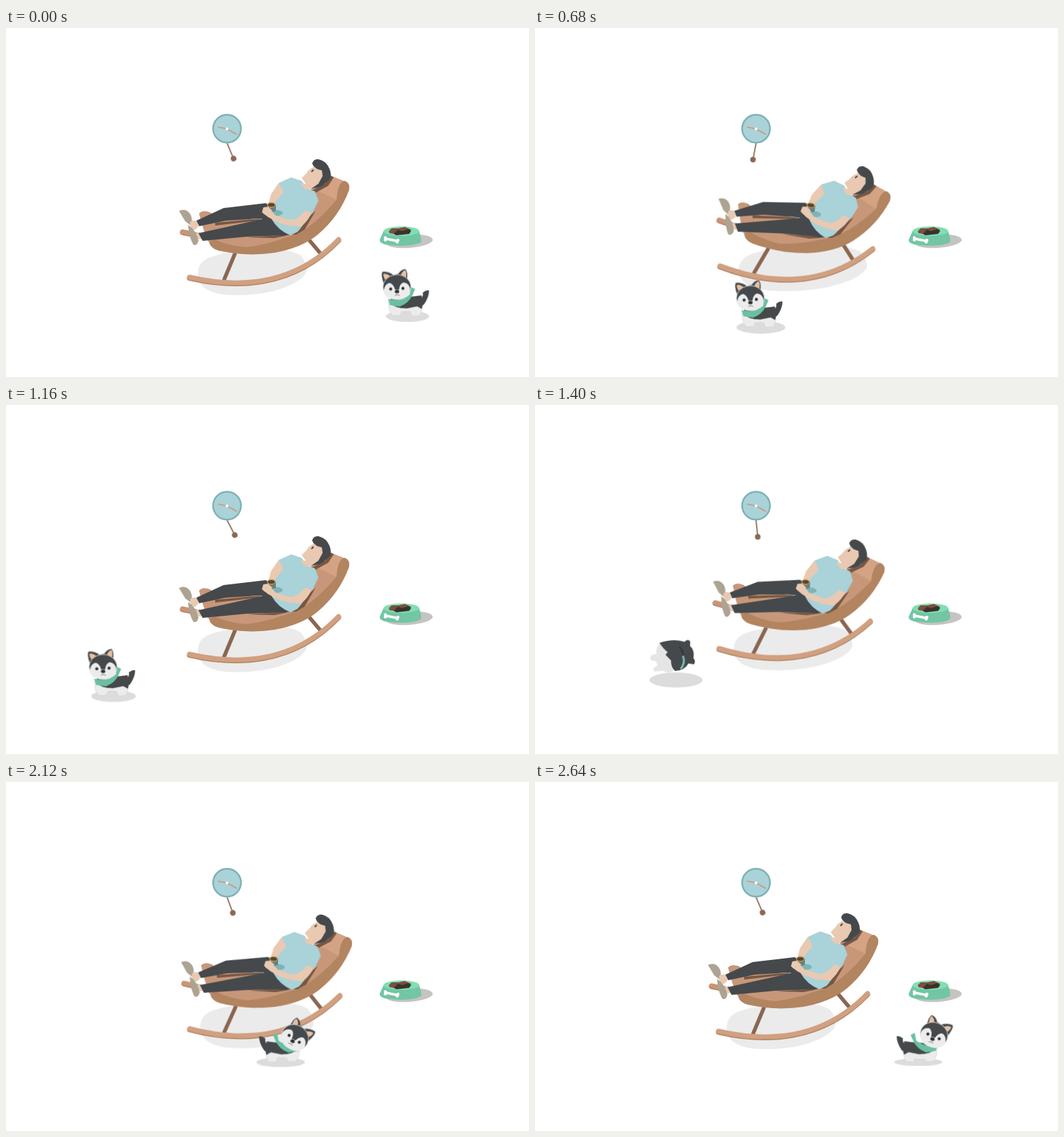
These frames come from a looping animation (750x500 px, 2680 ms). An HTML page without scripts:

```html
<!DOCTYPE html>
<html lang="en">
<head>
<meta charset="utf-8">
<title>Rocking chair and puppy</title>
<style>
  html, body { margin: 0; width: 100%; height: 100%; overflow: hidden; background: #fff; }
  svg { display: block; width: 100vw; height: 100vh; }

  .dark { fill: #45494c; }
  .skin { fill: #e9c9b1; }
  .shirt { fill: #a9d2d9; }
  .leather { fill: #c8977a; }
  .side { fill: #b28460; }
  .sole { fill: #ada392; }
  .fur { fill: #ececec; }
  .scarf { fill: #69c0a1; }
  .wood { fill: none; stroke: #8a6652; stroke-width: 5.5; stroke-linecap: round; }
  .rail { fill: none; stroke-width: 7; stroke-linecap: round; }

  .anim { animation: 2680ms linear infinite; }
  .step { animation: 2680ms step-end infinite; }
  #pendulum { animation-name: swing; transform-origin: 317px 165px; }
  #chair { animation-name: rock; transform-origin: 384px 365px; }
  #chair-shadow { animation-name: slide; }
  #dog { animation-name: run; }
  #dog-shadow { animation-name: spread; }
  #facing { animation-name: face; }
  #hop { animation-name: hop; }
  #stand { animation-name: stand; }
  #stand-head { animation-name: nod; transform-origin: 561px 370px; }
  #leap { animation-name: leap; }
  #roll { animation-name: roll; }
  #spin { animation-name: spin; transform-origin: 197px 360px; }

  @keyframes swing {
    0%, 98.51%, 100% { transform: rotate(-23deg); }
    16.42%, 20.9% { transform: rotate(22deg); }
    18.66% { transform: rotate(33deg); }
    34.33% { transform: rotate(-12deg); }
    41% { transform: rotate(-33deg); }
    52.24% { transform: rotate(-6deg); }
    63.4% { transform: rotate(33deg); }
    70.15% { transform: rotate(17deg); }
    77.6% { transform: rotate(-30deg); }
    88.06% { transform: rotate(36deg); }
  }
  @keyframes rock {
    0%, 38%, 44%, 77.6%, 98.51%, 100% { transform: rotate(0deg); }
    16.42%, 20.9%, 61.2%, 66.4%, 87.3%, 88.06% { transform: rotate(10.6deg); }
    34.33% { transform: rotate(2.1deg); }
    52.24% { transform: rotate(3.9deg); }
    70.15% { transform: rotate(9.1deg); }
  }
  @keyframes slide {
    0%, 38%, 44%, 77.6%, 98.51%, 100% { transform: translate(353px, 350px) scaleX(1); }
    16.42%, 20.9%, 61.2%, 66.4%, 87.3%, 88.06% { transform: translate(396px, 342px) scaleX(1.26); }
    34.33% { transform: translate(360.5px, 349px) scaleX(1.02); }
    52.24% { transform: translate(370px, 347.5px) scaleX(1.09); }
    70.15% { transform: translate(389.5px, 343px) scaleX(1.22); }
  }
  @keyframes run {
    0%, 100% { transform: translate(576px, 413px); }
    16.42% { transform: translate(433px, 438px); }
    20.9% { transform: translate(385px, 442px); }
    34.33% { transform: translate(203px, 403px); }
    41.79% { transform: translate(146px, 421px); }
    52.24% { transform: translate(202px, 394px); }
    62.69% { transform: translate(251px, 397px); }
    70.15% { transform: translate(296px, 398px); }
    88.06% { transform: translate(491px, 405px); }
    98.51% { transform: translate(549px, 401px); }
  }
  @keyframes spread {
    0%, 20.9%, 41.79%, 100% { transform: scale(1); }
    34.33% { transform: scale(1.4, 1.35); }
    52.24% { transform: scale(1.23, 1.35); }
    70.15% { transform: scale(.97, .9); }
    88.06% { transform: scale(1.27, .85); }
    98.51% { transform: scale(1.12, .7); }
  }
  @keyframes face {
    0%, 100% { transform: scaleX(1); }
    44.8% { transform: scaleX(-1); }
  }
  @keyframes hop {
    0%, 26.9%, 40.3%, 82.1%, 94%, 100% { transform: translate(0, 0); }
    34.33% { transform: translate(0, -24px); }
    88.06% { transform: translate(-12px, -44px); }
  }
  @keyframes nod {
    0%, 44.7%, 100% { transform: none; }
    44.8%, 98.51% { transform: translate(-8px, 3px) rotate(-20deg); }
    70.15% { transform: translate(-5px, 8px) rotate(-36deg); }
  }
  @keyframes stand {
    0%, 40.3%, 58.2%, 94%, 100% { visibility: visible; }
    26.9%, 44.8%, 82.1% { visibility: hidden; }
  }
  @keyframes leap {
    0%, 40.3%, 94%, 100% { visibility: hidden; }
    26.9%, 82.1% { visibility: visible; }
  }
  @keyframes roll {
    0%, 58.2%, 100% { visibility: hidden; }
    44.8% { visibility: visible; }
  }
  @keyframes spin {
    0%, 44.8% { transform: rotate(-180deg); }
    52.24% { transform: none; }
    58.2%, 100% { transform: rotate(150deg); }
  }
</style>
</head>
<body>
<svg viewBox="0 0 750 500" xmlns="http://www.w3.org/2000/svg">
  <defs>
    <g id="head" transform="translate(561 370) scale(.95) translate(-561 -370)">
      <path class="dark" d="M541 366Q536 352 539 348Q548 347 556 353L563 351Q567 344 574 344Q578 349 576 362Z" stroke="#b9b9b9" stroke-width=".8"/>
      <path d="M543 360Q539 353 541 351Q547 351 551 355ZM567 352Q570 346 574 346Q576 351 574 359Z" fill="#e8bf9f"/>
      <ellipse class="dark" cx="561" cy="371" rx="21" ry="18.500" stroke="#d8d8d8"/>
      <path class="fur" d="M541 376Q543 366 550 365Q556 367 558 375L564 375Q565 366 571 364Q579 365 581 374Q581 385 570 389Q560 392 549 388Q541 384 541 376Z"/>
      <path class="dark" d="M557 362L566 361L564 375L559 375Z"/>
      <g fill="#303437">
        <circle cx="551.500" cy="374" r="2.300"/><circle cx="570" cy="373" r="2.300"/>
        <ellipse cx="561" cy="378" rx="3.300" ry="2.500"/>
      </g>
      <path d="M558 384Q561 381 565 384" fill="none" stroke="#777" stroke-width="1.200"/>
    </g>
    <path id="rail" d="M263 357C328 372 411 372 477 303"/>
  </defs>

  <g id="clock">
    <g id="pendulum" class="anim">
      <path d="M317 165V188" stroke="#8a6652" stroke-width="1.700"/>
      <circle cx="317" cy="189" r="4" fill="#8d6750"/>
    </g>
    <circle cx="317" cy="144.300" r="20" fill="#a9d2d9" stroke="#7fb1b3" stroke-width="2.400"/>
    <path d="M304 142L317 144.500L331 152.500" fill="none" stroke="#cf9675" stroke-width="1.700"/>
    <circle cx="317" cy="144.500" r="2" fill="#fff"/>
  </g>

  <g id="bowl">
    <ellipse cx="578" cy="305.500" rx="34" ry="9.500" fill="#c6c3c3" transform="rotate(-4 578 305)"/>
    <path d="M542 290L536 303Q535 310 552 311Q582 314 595 307Q597 304 592 290Z" fill="#72c6a3"/>
    <ellipse cx="567" cy="291" rx="25.500" ry="6.800" fill="#80dfb1"/>
    <path d="M549 291L553 287L563 287L572 285L581 289L578 294L564 296L550 294Z" fill="#7b503d"/>
    <path d="M556 295L562 289L568 291L577 288L581 291L578 295L560 297Z" fill="#383231"/>
    <path d="M545 302L560 305" stroke="#fff" stroke-width="3.500"/>
    <g fill="#fff"><circle cx="544" cy="300.500" r="2.200"/><circle cx="544" cy="303.500" r="2.200"/><circle cx="562" cy="304" r="2.200"/><circle cx="561" cy="306.500" r="2.200"/></g>
  </g>

  <path id="chair-shadow" class="anim" fill="#ebebeb" d="M-78 2Q-78 -13 -64 -20Q-35 -32 20 -33Q56 -33 70 -24Q78 -14 78 -1Q70 16 30 27Q-5 35 -40 32Q-72 28 -77 10Z"/>

  <g id="chair" class="anim">
    <path d="M253 293L277 298" class="rail" stroke="#98694f" stroke-width="6"/>
    <path d="M253 292L276 297" class="rail" stroke="#cb9476" stroke-width="4"/>
    <path class="wood" d="M328 324L313 360M429 297L451 323"/>
    <use href="#rail" class="rail" y="1.500" stroke="#b28460"/>
    <use href="#rail" class="rail" stroke="#d0a081" stroke-width="6"/>

    <path class="side" d="M277 266Q282 260 292 264L300 270L425 280L474 220L486 219Q494 222 492 232Q478 270 447 296Q424 315 385 322Q345 328 305 319Q293 316 291 306Z"/>
    <path class="leather" d="M277 266Q282 260 292 265L300 272L425 278L438 228L464 211L484 219Q475 222 474 246Q450 275 425 291Q385 309 345 314Q318 312 300 303L290 306Q281 285 277 266Z"/>
    <path d="M464 211L484 219Q475 224 474 246L440 230Z" fill="#d3a384"/>
    <path d="M438 233L458 223L465 211L470 214L462 226L444 236ZM410 296L424 280L444 262L428 289L416 296ZM300 279L366 273L361 276L300 283ZM345 300L410 296L385 301Z" fill="#755743"/>

    <g id="legs">
      <path class="sole" d="M248 262Q259 257 265 268Q268 275 265 283L257 277Z"/>
      <path class="skin" d="M264 278Q269 274 274 277L276 284Q271 292 265 288ZM270 295L278 292L283 303L273 302Z"/>
      <path class="sole" d="M261 282Q272 289 276 304Q275 312 269 311Q264 303 262 291Z"/>
      <path class="dark" d="M273 276L312 258L372 251L390 258L382 274L364 273L315 276L277 284ZM276 294L362 275L385 268L412 294L400 297L345 299L282 305Z"/>
    </g>

    <path class="skin" d="M391 222L399 234L387 251L375 257L380 238Z"/>
    <path class="shirt" d="M391 222L409 214L424 219L432 230L443 234L448 247L440 264L433 269Q425 285 418 292L408 297Q390 290 381 274L384 252L398 235Z"/>
    <ellipse cx="389" cy="265" rx="8" ry="4" fill="#7fb3b6"/>
    <path class="skin" d="M438 265L429 261Q420 274 408 275L387 269L377 258L369 257L367 264L376 271Q400 286 424 284Q434 275 438 265Z"/>
    <path d="M377 253L387 253L387 262L379 264Z" fill="#66807f"/>
    <ellipse cx="380.500" cy="253.500" rx="5.500" ry="3.300" fill="#5a4636" stroke="#d5a047" stroke-width="1.200"/>
    <path class="skin" d="M369 257L376 256L382 262L376 270L369 266Z"/>

    <path class="skin" d="M422 223L430 232L444 229L452 222L456 206L446 197Q433 202 431 208L424 215L430 223Z"/>
    <path class="dark" d="M439 194Q441 187 448 188Q459 190 464 202Q467 210 465 216L455 225Q450 229 438 230L448 223L454 212L453 204L446 202L441 198Z"/>
    <path d="M438 206L441 203" stroke="#45494c" stroke-width="2"/>
  </g>

  <g id="dog" class="anim">
    <ellipse id="dog-shadow" class="anim" rx="31" ry="8" fill="#d9d9d9" fill-opacity=".9"/>
    <g id="facing" class="step">
      <g id="hop" class="anim">
        <g id="stand" class="step">
          <g transform="translate(-576 -413)">
            <path class="dark" d="M590 394Q600 385 598 379Q603 375 607 376Q607 386 599 397Z"/>
            <path class="dark" d="M552 386Q578 386 596 383Q600 394 596 404L552 404Z"/>
            <path class="fur" d="M549 392Q557 402 575 402L590 399L597 403L594 412L583 413L580 406L568 406L565 412L555 412Q548 405 549 392Z" stroke="#d5d5d5" stroke-width=".7"/>
            <path class="scarf" d="M548 388Q565 393 579 382L581 371L587 374L583 383Q578 394 565 399L551 397Z"/>
            <g id="stand-head" class="anim"><use href="#head"/></g>
          </g>
        </g>
        <g id="leap" class="step">
          <g transform="translate(-203 -379)">
            <path class="dark" d="M215 353Q221 348 218 343Q222 339 224 341Q225 352 221 361Z"/>
            <path class="fur" d="M188 362Q178 371 171 374L174 387Q190 381 198 374L218 372Q231 378 234 371L230 362L214 359Z" stroke="#d5d5d5" stroke-width=".7"/>
            <path class="dark" d="M193 351Q208 346 221 352L225 364Q218 373 198 371Z"/>
            <path class="scarf" d="M173 372Q194 365 198 343L206 342Q206 361 195 374Q184 381 173 372Z"/>
            <use href="#head" transform="translate(179 347) rotate(-22) translate(-561 -370)"/>
          </g>
        </g>
      </g>
    </g>
    <g id="roll" class="step">
      <g transform="translate(-202 -394)">
        <g id="spin" class="anim">
          <path fill="#e5e5e5" d="M179 341Q172 349 174 357Q165 358 165 363Q166 368 173 367L176 373Q167 378 171 382L185 381Q192 387 199 380L198 355Z"/>
          <path class="dark" d="M178 341Q198 334 214 339Q218 334 222 338L222 345Q229 351 227 362Q231 366 228 371L220 370Q215 380 201 381Q195 376 195 366L187 358L190 354Q184 350 178 341Z"/>
          <path d="M207 346Q218 361 209 377" fill="none" stroke="#303437" stroke-width="2"/>
          <path d="M212 359Q216 369 209 378" fill="none" stroke="#76b9b3" stroke-width="3"/>
        </g>
      </g>
    </g>
  </g>
</svg>
</body>
</html>
```
